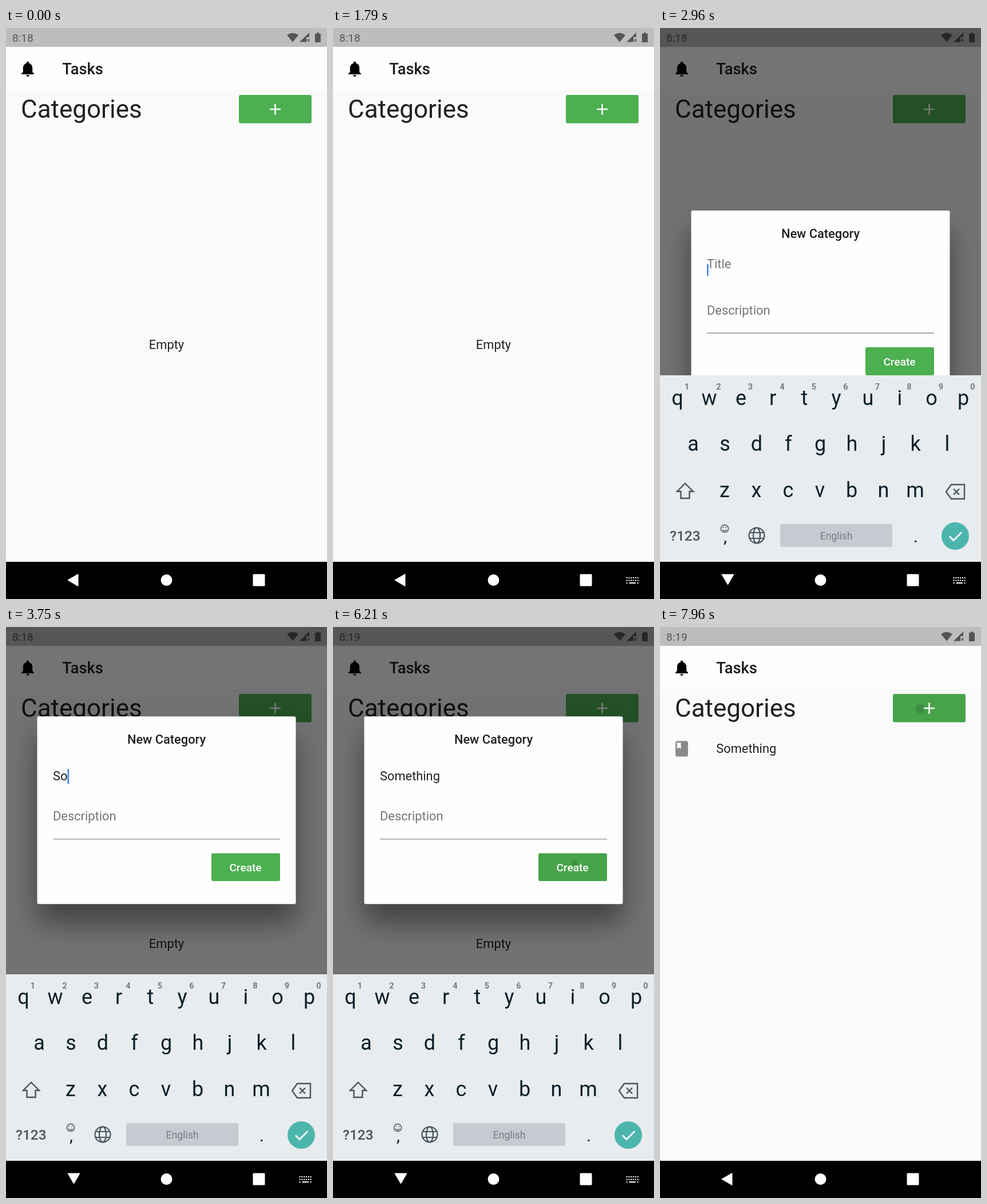
Animation, 561 px wide and 998 px high, one loop 8 s. Source, as an HTML page:

```html
<!DOCTYPE html>
<html lang="en">
<head>
<meta charset="utf-8">
<title>Tasks</title>
<style>
  html, body { margin: 0; height: 100%; overflow: hidden; background: #fafafa; }
  svg { display: block; width: 100vw; height: 100vh; font-family: Roboto, sans-serif; }
  text { white-space: pre; }
  .body { font-size: 21.84px; fill: #212121; }
  .medium { font-weight: 500; }
  .mid { text-anchor: middle; }
  .line { fill: none; stroke: #46555e; stroke-width: 2.4; stroke-linejoin: miter; }
</style>
</head>
<body>
<svg viewBox="0 0 561 998">
  <defs>
    <clipPath id="addClip"><rect x="407" y="117" width="127" height="49.500" rx="3"/></clipPath>
    <clipPath id="createClip"><rect x="359" y="239" width="120" height="49" rx="3"/></clipPath>
    <filter id="blur" x="-50%" y="-50%" width="200%" height="200%"><feGaussianBlur stdDeviation="24"/></filter>
  </defs>

  <g id="app">
    <rect width="561" height="998" fill="#fafafa"/>
    <rect y="33" width="561" height="76" fill="#fefefe"/>
    <rect width="561" height="33" fill="#bdbdbd"/>
    <g fill="#555">
      <text id="clock" x="11" y="24" font-size="19.1">8:18</text>
      <path d="M491 12.500Q501 5 511 12.500L501 24.500Z"/>
      <path d="M513 24.500L530 8V16H525V24.500Z"/>
      <path d="M526.500 19.500l4 4m0-4l-4 4" stroke="#555" stroke-width="1.400"/>
      <path d="M540 10h3V8h4v2h3v15h-10z"/>
    </g>
    <path transform="translate(21.600 55) scale(1.365)" d="M12 22c1.100 0 2-.9 2-2h-4c0 1.100.89 2 2 2zm6-6v-5c0-3.070-1.640-5.640-4.500-6.320V4c0-.83-.67-1.500-1.500-1.500s-1.500.67-1.500 1.500v.68C7.630 5.360 6 7.920 6 11v5l-2 2v1h16v-1l-2-2z"/>
    <text class="medium" x="98.300" y="81" font-size="27.300" fill="#1c1c1c">Tasks</text>
    <text x="26" y="157" font-size="44" fill="#212121">Categories</text>
    <g id="add" clip-path="url(#addClip)">
      <rect x="407" y="117" width="127" height="50" fill="#4caf50"/>
      <rect class="tint" x="407" y="117" width="127" height="50"/>
      <circle class="splash" cx="455" cy="143"/>
      <path d="M461 142h19M470.500 132.500v19" stroke="#fff" stroke-width="2.700"/>
    </g>
    <text id="empty" class="body mid" x="280.500" y="561">Empty</text>
    <g id="item">
      <path transform="translate(21.600 196.500) scale(1.365)" fill="#8a8a8a" d="M18 2H6c-1.100 0-2 .9-2 2v16c0 1.100.9 2 2 2h12c1.100 0 2-.9 2-2V4c0-1.100-.9-2-2-2zM6 4h5v8l-2.500-1.500L6 12V4z"/>
      <text class="body" x="98.300" y="220">Something</text>
    </g>
  </g>

  <g id="modal">
    <rect width="561" height="933" fill-opacity=".54"/>
    <g id="dialog">
      <rect x="54" y="33" width="452" height="328" fill-opacity=".42" filter="url(#blur)"/>
      <rect x="54.500" width="452" height="328" rx="3" fill="#fefefe"/>
      <text class="body medium mid" x="280.500" y="47.500">New Category</text>
      <text id="label" class="body" style="fill:#757575">Title</text>
      <text id="typed" class="body" x="82" y="112"></text>
      <rect id="cursor" width="2.700" fill="#4285f4"/>
      <text class="body" x="82" y="182" style="fill:#757575">Description</text>
      <path d="M82 214.300H479" stroke="#8c8c8c" stroke-width="1.400"/>
      <g id="create" clip-path="url(#createClip)">
        <rect x="359" y="239" width="120" height="49" fill="#4caf50"/>
        <rect class="tint" x="359" y="239" width="120" height="49"/>
        <circle class="splash" cx="422" cy="257"/>
        <text class="medium mid" x="418.500" y="271" font-size="19.100" fill="#fff">Create</text>
      </g>
    </g>
  </g>

  <g id="keyboard">
    <rect y="607" width="561" height="400" fill="#e8ecee"/>
    <g id="keys" class="mid" font-size="36" fill="#0b1f29"></g>
    <path class="line" d="M44 796L58 810H51.500V822H36.500V810H30Z"/>
    <path class="line" d="M509 798H532V823H509L500 810.500ZM513 805.500l10 10m0-10l-10 10"/>
    <text class="medium" x="17" y="895.500" font-size="24.500" fill="#46555e">?123</text>
    <g class="line" style="stroke-width:1.500">
      <circle cx="113" cy="875" r="6.600"/>
      <path d="M109.500 877q3.500 4 7 0M110.500 872v2M115.500 872v2"/>
    </g>
    <g class="line" style="stroke-width:2.200">
      <circle cx="169" cy="887" r="13.500"/>
      <ellipse cx="169" cy="887" rx="6" ry="13.500"/>
      <path d="M156.500 882h25M156.500 892h25"/>
    </g>
    <rect x="210" y="867" width="196" height="40" rx="3.500" fill="#c5cbd0"/>
    <text class="mid" x="308" y="893.500" font-size="17.700" fill="#747d83">English</text>
    <circle cx="516" cy="888" r="24" fill="#4db6ac"/>
    <path d="M506 888.500l7 7 14-14" fill="none" stroke="#fff" stroke-width="2.700"/>
  </g>

  <rect y="933" width="561" height="65"/>
  <g fill="#fff">
    <path id="back" stroke="#fff" stroke-linejoin="round"/>
    <circle cx="280.500" cy="965" r="10"/>
    <rect x="431.500" y="954.500" width="21" height="21" rx="1.500"/>
    <path id="imeIcon" fill="none" stroke="#fff" stroke-width="2.200" d="M517.500 970H529"/>
  </g>
</svg>
<script>
const LOOP = 8000;
const $ = id => document.getElementById(id);
const set = (el, attrs) => { for (const k in attrs) el.setAttribute(k, attrs[k]); };
const show = (id, on) => set($(id), { visibility: on ? 'visible' : 'hidden' });
const ramp = (t, from, to) => Math.min(1, Math.max(0, (t - from) / (to - from)));
const easeOut = p => 1 - (1 - p) ** 3;
const easeInOut = p => p * p * (3 - 2 * p);

function key(char, x, y, style = '') {
  $('keys').insertAdjacentHTML('beforeend', `<text x="${x}" y="${y}" style="${style}">${char}</text>`);
}
function keyRow(chars, x, y, style) {
  [...chars].forEach((char, i) => key(char, x + i * 55.5, y, style));
}
keyRow('qwertyuiop', 30.5, 659);
keyRow('asdfghjkl', 58, 739);
keyRow('zxcvbnm', 113, 820);
keyRow('1234567890', 47, 632, 'font-size:14.500px;font-weight:700;fill:#727c82');
key(',', 114, 899, 'font-size:30px');
key('.', 447, 899, 'font-size:30px');

let dots = $('imeIcon').getAttribute('d');
for (const y of [961, 965.5]) for (let i = 0; i < 6; i++) dots += `M${512.5 + i * 3.8} ${y}h2.200`;
dots += 'M512.500 970h2.200M531.500 970h2.200';
$('imeIcon').setAttribute('d', dots);

// Slow growth while held, quick spread and fade after release.
function press(id, t, down, up) {
  const held = Math.max(0, Math.min(t, up) - down);
  const release = ramp(t, up, up + 240);
  const strength = t < down ? 0 : 1 - release;
  set($(id).querySelector('.tint'), { 'fill-opacity': 0.07 * ramp(t, down, down + 70) * strength });
  set($(id).querySelector('.splash'), {
    r: held * 0.075 + 85 * easeOut(release),
    'fill-opacity': 0.12 * strength
  });
}

const WORD = 'Something', TYPE_START = 3480, TYPE_STEP = 140;
const LAST_KEY = TYPE_START + TYPE_STEP * (WORD.length - 1);

function render(t) {
  $('clock').textContent = t < 3900 ? '8:18' : '8:19';
  const saved = t >= 6600;
  show('empty', !saved);
  show('item', saved);

  if (t < 4000) press('add', t, 1120, 1220);
  else press('add', t, 7850, LOOP);
  press('create', t, 6140, 6280);

  const modal = ramp(t, 2720, 2870) * (1 - ramp(t, 6420, 6570));
  show('modal', modal > 0);
  set($('modal'), { opacity: easeOut(modal) });
  const lift = easeInOut(ramp(t, 3010, 3110));
  set($('dialog'), { transform: `translate(0 ${319 - 162.7 * lift})` });

  const float = easeInOut(ramp(t, 2980, 3180));
  set($('label'), {
    transform: `translate(82 ${101 - 26 * float}) scale(${1 - 0.25 * float})`,
    opacity: 1 - float
  });

  const count = Math.min(WORD.length, Math.max(0, Math.floor((t - TYPE_START) / TYPE_STEP) + 1));
  $('typed').textContent = WORD.slice(0, count);
  const typing = t >= TYPE_START && t < LAST_KEY;
  const blinkFrom = t < TYPE_START ? 2720 : LAST_KEY;
  const lit = typing || Math.floor((t - blinkFrom) / 500) % 2 === 0;
  set($('cursor'), {
    x: 82 + (count ? $('typed').getComputedTextLength() : 0),
    y: count ? 92 : 94,
    height: count ? 26 : 20,
    'fill-opacity': lit ? 1 : 0
  });

  const keyboard = easeOut(ramp(t, 1880, 2070)) * (1 - ramp(t, 6620, 6780));
  show('keyboard', keyboard > 0);
  set($('keyboard'), { opacity: keyboard, transform: `translate(0 ${65 * (1 - keyboard)})` });
  show('imeIcon', t >= 1790 && t < 6620);
  set($('back'), {
    d: t >= 1880 && t < 6620 ? 'M108 955H129L118.500 973Z' : 'M108 965L126 954.500V975.500Z'
  });
}

function tick() {
  render(performance.now() % LOOP);
  requestAnimationFrame(tick);
}
tick();
</script>
</body>
</html>
```
